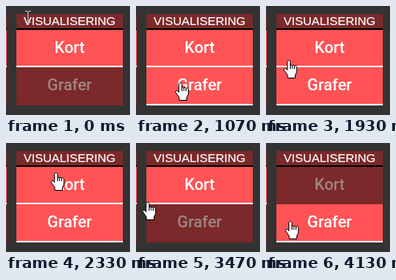
These frames come from a looping animation (155x137 px, 4470 ms). An HTML page:

```html
<!DOCTYPE html>
<html lang="da">
<head>
<meta charset="utf-8">
<title>Visualisering</title>
<style>
  html, body { margin: 0; width: 100%; height: 100%; overflow: hidden; background: #333; }
  svg { display: block; width: 155px; height: 137px; }
  .head, .button { fill: #7b292a; }
  .button .line { fill: none; }
  .button text { fill: #a08484; font: 500 20px Roboto, sans-serif; }
  .button.on { fill: #ff5355; }
  .button.on .line, .button.on text { fill: #fff; }
  .title { fill: #fff; font: 15px "Liberation Sans", Arial, sans-serif; stroke: #fff; stroke-width: .2px; }
  text { text-anchor: middle; }
  .cursor { fill: #fff; stroke: #000; stroke-linejoin: round; }
</style>
</head>
<body>
<svg viewBox="0 0 155 137">
  <!-- Edge of the neighbouring column -->
  <rect class="head" y="10" width="1" height="18"/>
  <rect y="28" width="1" height="2"/>
  <g class="button on">
    <rect y="30" width="1" height="47"/>
    <rect class="line" y="75" width="1" height="2"/>
  </g>
  <g class="button"><rect y="77" width="1" height="48"/></g>

  <rect class="head" x="13" y="10" width="133" height="18"/>
  <rect x="13" y="28" width="133" height="2"/>
  <text class="title" x="79.5" y="24">VISUALISERING</text>

  <g id="kort" class="button">
    <rect x="13" y="30" width="133" height="47"/>
    <rect class="line" x="13" y="75" width="133" height="2"/>
    <text x="79.5" y="59">Kort</text>
  </g>
  <g id="grafer" class="button">
    <rect x="13" y="77" width="133" height="48"/>
    <rect class="line" x="13" y="123" width="133" height="2"/>
    <text x="79.5" y="106">Grafer</text>
  </g>

  <path id="beam" fill="none" stroke="#d5d5d5"
    d="M-3 -6.5H-1L.5 -5.5L2 -6.5H4M.5 -5.5V6.5M-3 7.5H-1L.5 6.5L2 7.5H4"/>
  <path id="arrow" class="cursor" d="M.5 .5V16.5L4.2 12.9L6.6 18.5L9 17.5L6.6 12H11.5Z"/>
  <path id="hand" class="cursor" d="M-.5 .5C-1.6 .5 -2.4 1.2 -2.4 2.3V12.5L-3.7 11
    C-4.6 10.1 -5.9 10.3 -6.4 11.2C-6.7 11.8 -6.4 12.5 -6 13.1L-2 19V22.5H7.5V19L9.4 15V8.6
    C9.4 7.6 8.7 6.9 7.8 6.9C7.1 6.9 6.7 7.2 6.5 7.6C6.3 6.8 5.7 6.3 4.9 6.3
    C4.1 6.3 3.6 6.7 3.4 7.2C3.2 6.4 2.6 6 1.4 6.2V2.3C1.4 1.2 .6 .5 -.5 .5Z
    M1.4 6V11M3.9 7V11M6.5 7.6V11"/>
</svg>
<script>
  const LOOP = 4470, STEP = 200 / 3;

  // Each move bends from the last resting point past `via` to `to`
  const home = [27, 13];
  const moves = [
    { start: 0, end: 5, via: [14, 22], to: [9, 2] },
    { start: 7, end: 16, via: [-20, 80], to: [56, 96] },
    { start: 24, end: 36, via: [-4.5, 54], to: [66, 36] },
    { start: 44, end: 57, via: [-14, 59], to: [31, 98] }
  ];

  const get = id => document.getElementById(id);
  const kort = get('kort'), grafer = get('grafer');
  const cursors = ['beam', 'arrow', 'hand'].map(get);

  const ease = p => p * p * (3 - 2 * p);
  const bend = (a, b, c, k) => a * (1 - k) ** 2 + 2 * b * k * (1 - k) + c * k * k;

  function pointer(step) {
    let at = home;
    for (const { start, end, via, to } of moves) {
      if (step < start) break;
      const k = ease(Math.min(1, (step - start) / (end - start)));
      at = at.map((a, i) => bend(a, via[i], to[i], k));
    }
    return at.map(Math.round);
  }

  function draw(now) {
    // The screen refreshes 15 times a second
    const step = Math.floor((now % LOOP + 4) / STEP);
    const [x, y] = pointer(step);
    const inside = x >= 13 && x < 146;
    const onKort = inside && y >= 30 && y < 77;
    const onGrafer = inside && y >= 77 && y < 125;
    const graferChosen = step >= 20 && step < 41 || step >= 62;

    kort.classList.toggle('on', onKort || !graferChosen);
    grafer.classList.toggle('on', onGrafer || graferChosen);

    const shape = onKort || onGrafer ? 'hand' : x >= 20 ? 'beam' : 'arrow';
    for (const c of cursors) {
      c.style.display = c.id === shape ? '' : 'none';
      c.setAttribute('transform', `translate(${x} ${y})`);
    }
  }

  const begin = performance.now();
  function tick() {
    draw(performance.now() - begin);
    requestAnimationFrame(tick);
  }
  tick();
</script>
</body>
</html>
```
